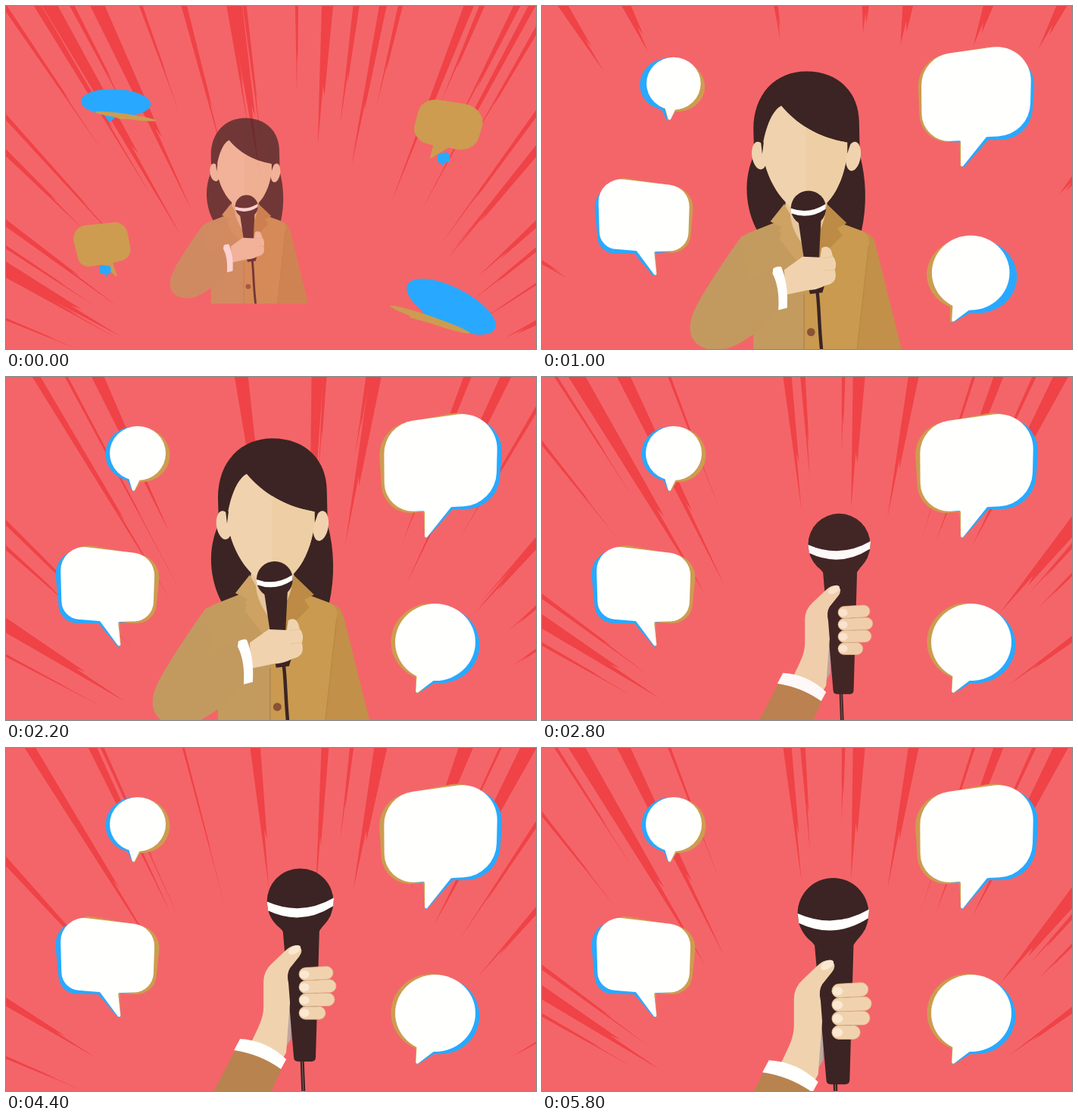
An HTML page with a canvas for the animation above (6000 ms loop, 700 px wide and 454 px high).

```html
<!DOCTYPE html>
<html lang="en">
<head>
<meta charset="utf-8">
<title>Interview</title>
<style>
html, body { margin: 0; width: 100%; height: 100%; overflow: hidden; background: #f46569; }
canvas { display: block; width: 700px; height: 454px; }
</style>
</head>
<body>
<canvas id="stage" width="700" height="454"></canvas>
<script>
const W = 700, H = 454, LOOP = 6000, STEP = 200, CUT = 2600, BURSTS = 15;
const RED = '#f46569', RAY = '#ef4347', BLUE = '#28a9ff', GOLD = '#cd9c50', WHITE = '#fffffe';
const DARK = '#3b2423', SKIN = '#f0d3ae', NAIL = '#fae8d3';

const stage = document.getElementById('stage').getContext('2d');
const layer = document.createElement('canvas');
layer.width = W;
layer.height = H;
const lay = layer.getContext('2d');

const settle = (t, tau) => 1 - Math.exp(-t / tau);

function rng(seed) {
  return () => {
    seed = (seed * 16807) % 2147483647;
    return seed / 2147483647;
  };
}

function shape(c, d, color) {
  c.fillStyle = color;
  c.fill(new Path2D(d));
}

function line(c, d, color, width) {
  c.strokeStyle = color;
  c.lineWidth = width;
  c.stroke(new Path2D(d));
}

function oval(c, x, y, rx, ry, color, rot = 0) {
  c.fillStyle = color;
  c.beginPath();
  c.ellipse(x, y, rx, ry, rot, 0, Math.PI * 2);
  c.fill();
}

// ---- Speed lines, all pointing at one spot below the stage ----
const HUB = { x: 385, y: 575 };
const BEAMS = [-58, -31, -25, -7, 3, 10, 20, 27, 41];

// Distance from the hub to the stage border, for an angle from straight up
function border(a) {
  const side = a < 0 ? HUB.x : W - HUB.x;
  return Math.min(HUB.y / Math.cos(a), side / Math.abs(Math.sin(a)));
}

function ray(deg, reach, width) {
  const a = deg * Math.PI / 180, far = border(a) + 40;
  const tip = far - (far - 250 - 140 * Math.cos(a) ** 2) * reach;
  stage.save();
  stage.translate(HUB.x, HUB.y);
  stage.rotate(a);
  stage.beginPath();
  stage.moveTo(-width / 2, -far);
  stage.lineTo(0, -tip);
  // a split end
  const split = tip + (far - tip) * 0.35;
  stage.lineTo(width * 0.1, -split);
  stage.lineTo(width * 0.25, -split + 14);
  stage.lineTo(width / 2, -far);
  stage.fill();
  stage.restore();
}

// Dense at first, thinning out to a few short strokes at phase 5, then filling up again
function burst(phase) {
  const rand = rng(phase * 7919 + 13), gap = Math.abs(phase - 5);
  const fill = Math.min(1, 0.35 + 0.3 * gap);
  const extra = phase ? Math.min(12, 4 * gap) : 26;
  stage.fillStyle = RAY;
  BEAMS.forEach(deg => ray(deg + rand() * 3 - 1.5, fill * (0.85 + rand() * 0.3), 8 + 14 * rand()));
  for (let i = 0; i < extra; i++) {
    ray(-70 + 135 * (i + rand()) / extra, fill * (0.6 + rand() * 0.5), 3 + 7 * rand());
  }
}

// ---- Speech bubbles, drawn around their own centre ----
function roundPoly(c, pts) {
  const n = pts.length, a = pts[n - 1], b = pts[0];
  c.beginPath();
  c.moveTo((a[0] + b[0]) / 2, (a[1] + b[1]) / 2);
  pts.forEach((p, i) => {
    const q = pts[(i + 1) % n];
    c.arcTo(p[0], p[1], q[0], q[1], p[2]);
  });
  c.closePath();
  c.fill();
}

function roundBubble(rx, ry, tail) {
  return c => {
    c.beginPath();
    c.ellipse(0, 0, rx, ry, 0, 0, Math.PI * 2);
    c.fill();
    roundPoly(c, tail);
  };
}

// lead, follow: colour, lean about the tail tip, starting pose [x, y, turn, scale x, scale y]
const BUBBLES = [
  {
    x: 174, y: 102, tip: [-6, 50],
    draw: roundBubble(37, 36, [[-14, 26, 1], [-6, 53, 2], [5, 30, 1]]),
    lead: [BLUE, -1, [145, 128, 0.05, 1.25, 0.5]],
    follow: [GOLD, 1, [158, 146, 0.14, 1.1, 0.09]]
  },
  {
    x: 134, y: 277, tip: [17, 80],
    draw: c => roundPoly(c, [
      [-63, -55, 31], [63, -40, 30], [60, 47, 26], [14, 48, 2], [18, 85, 2], [-10, 47, 2], [-60, 43, 24]
    ]),
    lead: [GOLD, 1, [127, 315, -0.22, 0.58, 0.57]],
    follow: [BLUE, -1, [131, 349, 0, 0.12, 0.12]]
  },
  {
    x: 573, y: 115, tip: [-18, 97],
    draw: c => roundPoly(c, [
      [-74, -51, 44], [77, -72, 46], [74, 55, 46], [15, 58, 2], [-20, 102, 2], [-20, 63, 2], [-73, 66, 38]
    ]),
    lead: [GOLD, -1, [584, 157, 0.27, 0.58, 0.5]],
    follow: [BLUE, 1, [578, 201, 0, 0.11, 0.11]]
  },
  {
    x: 567, y: 352, tip: [-25, 65],
    draw: roundBubble(53, 51, [[-24, 36, 1], [-26, 69, 2], [3, 47, 1]]),
    lead: [BLUE, 1, [588, 398, 0.47, 1.22, 0.5]],
    follow: [GOLD, -1, [560, 415, 0.33, 1.05, 0.09]]
  }
];

// Final pose when leaning about the tail tip
function leaning(b, turn) {
  const [x, y] = b.tip, cos = Math.cos(turn), sin = Math.sin(turn);
  return [b.x + x - x * cos + y * sin, b.y + y - x * sin - y * cos, turn, 1, 1];
}

function pose(b, color, from, to, p) {
  const [x, y, turn, sx, sy] = from.map((v, i) => v + (to[i] - v) * p);
  stage.save();
  stage.translate(x, y);
  stage.rotate(turn);
  stage.scale(sx, sy);
  stage.fillStyle = color;
  b.draw(stage);
  stage.restore();
}

function bubbles(t) {
  BUBBLES.forEach(b => {
    [b.lead, b.follow].forEach(([color, side, from]) => {
      pose(b, color, from, leaning(b, side * 5.5 / b.tip[1]), settle(t, 380));
    });
    if (t) pose(b, WHITE, [b.x + b.tip[0], b.y + b.tip[1], 0, 0, 0], [b.x, b.y - 1, 0, 1, 1], settle(t, 290));
  });
}

// ---- Reporter ----
function reporter(c) {
  // hair, ears, face
  const hair = 'M280 160C280 112 310 81 352 81C398 81 424 112 424 150L425 195C434 228 435 265 427 300' +
    'L286 300C268 268 266 226 281 195Z';
  shape(c, hair, DARK);
  oval(c, 288, 196, 10, 19, SKIN, -0.15);
  oval(c, 416, 197, 10, 20, SKIN, 0.15);
  shape(c, 'M326 245L378 245L386 300L352 350L318 300Z', '#e8c69c');
  const face = 'M318 128C302 136 293 172 292 190C298 236 328 274 352 274C380 274 404 236 408 190' +
    'L408 178C368 172 338 152 318 128Z';
  shape(c, face, SKIN);
  shape(c, 'M290 176L294 178L292 194Z', DARK);
  shape(c, 'M404 176L413 178L408 193Z', DARK);
  c.save();
  c.beginPath();
  c.rect(351, 0, 200, 300);
  c.clip();
  shape(c, face, '#eecfa5');
  c.restore();

  // coat
  shape(c, 'M395 288L430 300Q443 304 446 316L485 473L420 473Z', '#c29049');
  shape(c, 'M352 345L318 284L275 301Q264 305 262 314L270 400L280 430L280 473L352 473Z', '#c49b5e');
  shape(c, 'M350 345L388 284L428 299Q440 304 437 318L420 473L350 473Z', '#c99a50');
  line(c, 'M437 320L420 473', '#b98842', 1.2);
  shape(c, 'M322 262L303 286L319 294L311 304L350 354L352 324Q332 300 330 276Z', '#cda263');
  shape(c, 'M380 262L407 288L394 295L401 305L352 354L352 324Q372 304 378 276Z', '#bd8b46');
  line(c, 'M349 385L349 473', '#a87d44', 1);
  oval(c, 358.5, 437, 5.5, 5.5, '#8a5233');
  line(c, 'M367 382C370 405 369 430 374 473', DARK, 4.5);

  // bent arm
  shape(c, 'M264 306C248 328 222 366 203 400C185 434 194 456 222 461C246 464 262 452 280 440' +
    'L318 405Q318 370 308 348L272 365Z', '#c29a60');
  shape(c, 'M264 306L272 365L308 348L318 300Z', '#c49b5e');

  // microphone and fist
  shape(c, 'M341 284L372 284L369 345L350 345Z', DARK);
  oval(c, 355, 268, 24, 24, DARK);
  shape(c, 'M331 268Q355 277 378.5 262L378.5 269Q356 284 331.5 275Z', WHITE);
  shape(c, 'M355 376L377 373L374 383L357 385Z', DARK);
  shape(c, 'M322 352L347 334L371 335L373 322Q385 316 388 333Q395 342 391 352Q396 370 379 373' +
    'Q366 380 353 380L324 386Z', SKIN);
  line(c, 'M374 336L388 334M376 353L391 352', '#e5c094', 0.8);
  shape(c, 'M307 350Q313 346 318 348Q328 372 326 404L314 407Q316 376 306 357Z', WHITE);
}

// ---- Hand with microphone ----
function handMic(c) {
  line(c, 'M391 414L394 490', DARK, 5);
  line(c, 'M391 414L394 490', '#7b6663', 1);
  shape(c, 'M368 325L377 330L376 388L368 402Z', '#b9a8a3');
  shape(c, 'M365 238L414 238L409 412Q409 418 403 418L386 418Q380 418 380 412Z', DARK);
  oval(c, 388.5, 206, 44, 44, DARK);
  shape(c, 'M350 226L366 246L413 246L429 224Z', DARK);
  shape(c, 'M344.5 206Q390 226 433 201L432 212Q390 239 346 218Z', WHITE);

  // palm and thumb
  shape(c, 'M324 392C332 374 340 362 340 345L340 312Q340 298 351 288L370 270Q380 261 388 266' +
    'Q393 271 387 279L375 294Q370 302 373 314L375 340Q372 375 370 406L362 420Z', SKIN);
  oval(c, 381, 270, 9, 5, NAIL, -0.55);

  // fingers, top to bottom
  [45, 49, 47, 35].forEach((w, i) => {
    const y = 302.5 + i * 17;
    c.save();
    c.translate(387, y);
    c.rotate(i * 0.02 - 0.06);
    c.beginPath();
    c.roundRect(0, -8.5, w, 17, 8.5);
    c.fillStyle = SKIN;
    c.fill();
    c.strokeStyle = '#dcb78e';
    c.lineWidth = 0.7;
    c.stroke();
    c.restore();
    oval(c, 394, y, 6.5, 5.5, NAIL);
  });

  // sleeve and cuff
  shape(c, 'M303 402Q336 407 364 428L322 520L241 520Z', '#b98350');
  shape(c, 'M309 388Q344 390 370 415L363 428Q335 408 301 403Z', WHITE);
}

// Draw on a separate layer so that fading stays even across overlaps
function group(age, draw, scale, from, to) {
  lay.setTransform(1, 0, 0, 1, 0, 0);
  lay.clearRect(0, 0, W, H);
  lay.translate(...to);
  lay.scale(scale, scale);
  lay.translate(-from[0], -from[1]);
  draw(lay);
  stage.globalAlpha = 1 - 0.3 * Math.exp(-age / 100);
  stage.drawImage(layer, 0, 0);
  stage.globalAlpha = 1;
}

function render(t) {
  stage.fillStyle = RED;
  stage.fillRect(0, 0, W, H);
  burst((t / STEP) % BURSTS);

  if (t < CUT) {
    const focus = [255, 261];
    group(t, reporter, 0.627 + 0.373 * settle(t, 400), focus, focus);
  } else {
    const age = t - CUT, rise = Math.exp(-age / 400);
    const sink = Math.max(0, (t - 4400) / 1400) ** 2;
    group(age, handMic, 1 - 0.11 * rise + 0.067 * sink, [388.5, 162],
      [388.5 + 6.6 * rise - 4 * sink, 159 + 36 * rise + 13 * sink]);
  }
  bubbles(t);
}

const start = performance.now();

function tick() {
  const t = (performance.now() - start) % LOOP;
  render(Math.floor(t / STEP) * STEP);
  requestAnimationFrame(tick);
}
tick();
</script>
</body>
</html>
```
